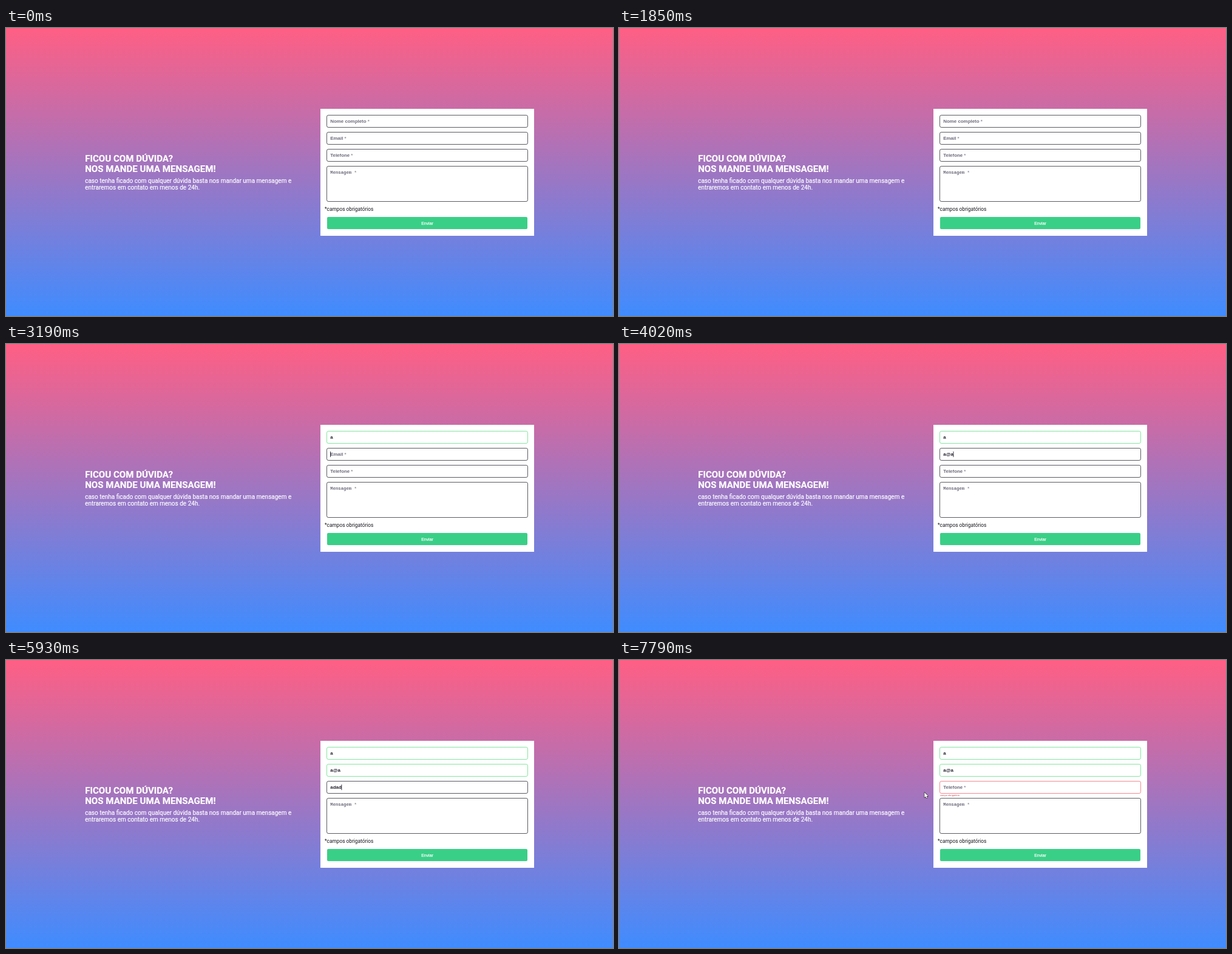
Write an HTML page with a canvas that moves like this. It is 1000x474 px and loops after 8000 ms.

```html
<!DOCTYPE html>
<html lang="pt">
<head>
<meta charset="utf-8">
<style>
html, body { margin: 0; width: 100%; height: 100%; overflow: hidden; }
canvas { display: block; width: 1000px; height: 474px; }
</style>
</head>
<body>
<canvas id="stage"></canvas>
<script>
const W = 1000, H = 474, LOOP = 8000;
const canvas = document.getElementById('stage');
const ctx = canvas.getContext('2d');
const dpr = window.devicePixelRatio || 1;
canvas.width = W * dpr;
canvas.height = H * dpr;

const SANS = '"Liberation Sans", Arial, sans-serif';
const ROBOTO = 'Roboto, sans-serif';
const INPUT_FONT = `bold 7.9px ${SANS}`;
const AREA_FONT = 'bold 7.25px "Liberation Mono", monospace';
const INK = '#24242e', GREEN = '#5cdc82', RED = '#f0616f';
const FIELD = { x: 528.5, w: 331, h: 20 };
const TEXT_X = 534.3, COPY_X = 130.2;

// Each list holds [time, value] steps; the last one reached applies.
const NAME = [[0, ''], [2430, 'a']];
const EMAIL = [[0, ''], [3630, 'a'], [3860, 'a@'], [4020, 'a@a']];
const PHONE = [[0, ''], [5430, 'a'], [5580, 'ad'], [5740, 'ada'], [5890, 'adad'], [6040, 'adada'], [7310, '']];
const FOCUS = [[0, ''], [2130, 'name'], [3190, 'email'], [4850, 'phone'], [7790, '']];
const SELECTED = [[0, 0], [6640, 1], [6670, 3], [6700, 4], [6760, 5], [7310, 0]];
const POINTER = [
  [[1400, 545, 153], [1510, 511.6, 154.4], [1680, 514, 155], [1870, 545, 153]],
  [[7400, 545, 211], [7650, 503.3, 218], [LOOP, 503.3, 218]]
];

function at(steps, t) {
  let value = steps[0][1];
  for (const [time, v] of steps) if (t >= time) value = v;
  return value;
}

function text(str, x, y, font, color, align = 'left') {
  ctx.font = font;
  ctx.fillStyle = color;
  ctx.textAlign = align;
  ctx.fillText(str, x, y);
}

// White copy is drawn slightly heavier than the plain font weight.
function whiteText(str, x, y, font, align = 'left') {
  text(str, x, y, font, '#fff', align);
  ctx.strokeStyle = '#fff';
  ctx.lineWidth = 0.2;
  ctx.lineJoin = 'round';
  ctx.strokeText(str, x, y);
}

function box(y, h, border) {
  ctx.beginPath();
  ctx.roundRect(FIELD.x, y, FIELD.w, h, 2.6);
  ctx.strokeStyle = border;
  ctx.lineWidth = 0.75;
  ctx.stroke();
}

function label(str, y, font) {
  text(str, TEXT_X, y, font, '#6d6a7c');
  const x = TEXT_X + ctx.measureText(str + ' ').width;
  text('*', x, y, font, '#918e9b');
}

function input(y, hint, value, border, caret, selected = 0) {
  box(y, FIELD.h, border);
  const base = y + 12.7;
  ctx.font = INPUT_FONT;
  const width = ctx.measureText(value).width;
  if (value) text(value, TEXT_X, base, INPUT_FONT, INK);
  else label(hint, base, INPUT_FONT);
  if (selected) {
    const part = value.slice(-selected);
    const partWidth = ctx.measureText(part).width;
    const x = TEXT_X + width - partWidth;
    ctx.fillStyle = '#3665cc';
    ctx.fillRect(x, y + 5.2, partWidth, 9.6);
    text(part, x, base, INPUT_FONT, '#fff');
  } else if (caret) {
    ctx.fillStyle = INK;
    ctx.fillRect(TEXT_X + width - 0.3, y + 5.4, 0.9, 9.2);
  }
}

function background() {
  const sky = ctx.createLinearGradient(0, 0, 0, H);
  sky.addColorStop(0, '#ff5f84');
  sky.addColorStop(1, '#3f8cff');
  ctx.fillStyle = sky;
  ctx.fillRect(0, 0, W, H);
}

function intro() {
  const title = `bold 15.1px ${ROBOTO}`, body = `10px ${ROBOTO}`;
  whiteText('FICOU COM DÚVIDA?', COPY_X, 219.6, title);
  whiteText('NOS MANDE UMA MENSAGEM!', COPY_X, 237.2, title);
  whiteText('caso tenha ficado com qualquer dúvida basta nos mandar uma mensagem e', COPY_X, 254.6, body);
  whiteText('entraremos em contato em menos de 24h.', COPY_X, 266.4, body);
}

function form(t) {
  const focus = at(FOCUS, t);
  const failed = t >= 7790;
  ctx.fillStyle = '#fff';
  ctx.fillRect(518, 133, 352, 209);

  input(143.5, 'Nome completo', at(NAME, t), t < 3190 ? INK : GREEN, focus === 'name');
  input(171.5, 'Email', at(EMAIL, t), t < 4850 ? INK : GREEN, focus === 'email');
  input(199.5, 'Telefone', at(PHONE, t), failed ? RED : INK,
    focus === 'phone' && !(t >= 6320 && t < 6640), at(SELECTED, t));
  if (failed) text('campo obrigatório', 528.8, 223.7, `3.95px ${ROBOTO}`, '#e5404c');

  box(227.5, 58, INK);
  label('Mensagem', 240.4, AREA_FONT);
  text('*campos obrigatórios', 525, 301.3, `8.33px ${ROBOTO}`, '#16161e');

  ctx.fillStyle = '#3acf87';
  ctx.beginPath();
  ctx.roundRect(529, 311, 330, 20, 2);
  ctx.fill();
  whiteText('Enviar', 694, 323.8, `6.94px ${SANS}`, 'center');
}

function pointer(t) {
  for (const path of POINTER) {
    for (let i = 1; i < path.length; i++) {
      const [t0, x0, y0] = path[i - 1], [t1, x1, y1] = path[i];
      if (t < t0 || t >= t1) continue;
      const k = (t - t0) / (t1 - t0), ease = k * k * (3 - 2 * k);
      const x = x0 + (x1 - x0) * ease;
      if (x < FIELD.x) arrow(x, y0 + (y1 - y0) * ease);
    }
  }
}

function arrow(x, y) {
  ctx.save();
  ctx.translate(x, y);
  const shape = new Path2D('M0 0V8.3L1.9 6.6L3.1 9.4L4.6 8.8L3.4 6.1H5.9Z');
  ctx.lineJoin = 'round';
  ctx.lineWidth = 1.2;
  ctx.strokeStyle = '#222';
  ctx.fillStyle = '#fff';
  ctx.stroke(shape);
  ctx.fill(shape);
  ctx.restore();
}

const start = performance.now();
function draw() {
  const t = (performance.now() - start) % LOOP;
  ctx.setTransform(dpr, 0, 0, dpr, 0, 0);
  background();
  intro();
  form(t);
  pointer(t);
  requestAnimationFrame(draw);
}
draw();
</script>
</body>
</html>
```
